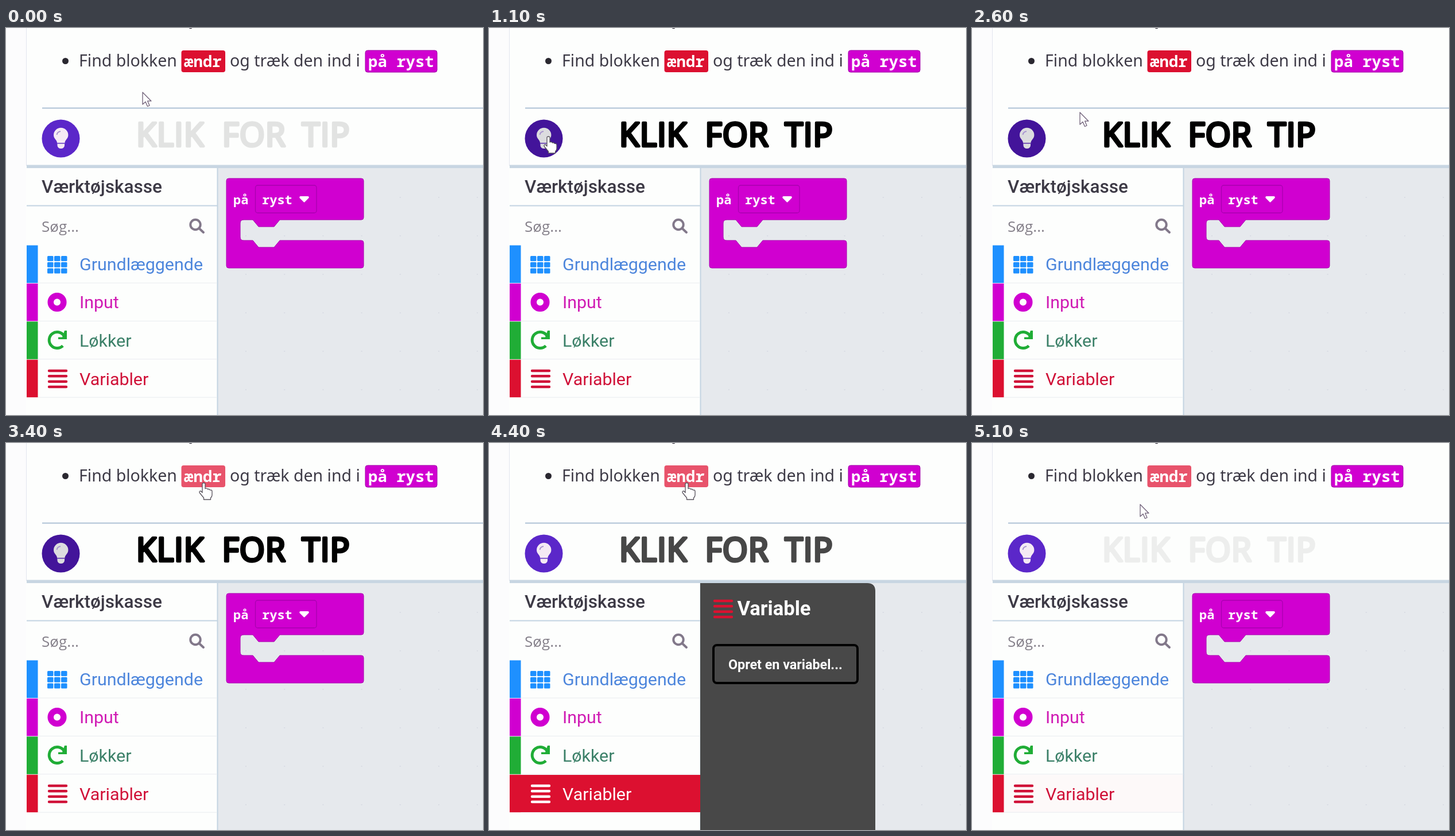
Animation of 831 by 674 pixels, one loop 5200 ms. Source, as an HTML page:

```html
<!DOCTYPE html>
<html lang="da">
<head>
<meta charset="utf-8">
<title>Klik for tip</title>
<style>
html, body { margin: 0; width: 100%; height: 100%; overflow: hidden; background: #fdfefd; }
svg { display: block; width: 831px; height: 674px; }
text { white-space: pre; }
.body { font: 28.5px "Noto Sans", sans-serif; fill: #3d3a46; }
.code { font: bold 27.3px "Noto Sans Mono", monospace; fill: #fff; }
.block { font: bold 22px "Noto Sans Mono", monospace; fill: #fff; }
.big { font-size: 24.2px; }
.item { font: 30.4px Roboto, sans-serif; }
.head { font: 500 31.5px Roboto, sans-serif; fill: #3d3a46; }
.search { font: 26px "Open Sans", sans-serif; fill: #85808a; }
.fly { font-family: Roboto, sans-serif; font-weight: 700; fill: #fff; }
.tip { font: 56.5px "Open Sans", sans-serif; letter-spacing: 1px; stroke: #000; stroke-width: 4.5; stroke-linejoin: round; }
.field { fill: none; stroke: #a900b0; stroke-width: 1.3; }
</style>
</head>
<body>
<svg viewBox="0 0 831 674">
  <defs>
    <path id="bars" d="M2 2H32M2 11.3H32M2 20.7H32M2 30H32" stroke="currentColor" stroke-width="4.4" stroke-linecap="round"/>
    <path id="caret" d="M-7-5H7Q9-4 8-2L1 5Q0 6-1 5L-8-2Q-9-4-7-5Z" fill="#fff"/>
    <pattern id="dots" x="417" y="294" width="67.2" height="67" patternUnits="userSpaceOnUse">
      <rect width="2" height="2" fill="#d9dce4"/>
    </pattern>
  </defs>

  <!-- instructions -->
  <rect width="831" height="674" fill="#fdfefd"/>
  <rect width="35" height="674" fill="#fcfcfd"/>
  <path d="M35.5 0V240" stroke="#e3e6ef"/>
  <path d="M319 0Q322 2 324 0" fill="#3d3a46" stroke="#3d3a46"/>
  <circle cx="103.5" cy="57.5" r="5.5" fill="#2a2830"/>
  <text class="body" x="127" y="67">Find blokken</text>
  <rect id="chip" x="305.5" y="39" width="76.5" height="38" rx="4"/>
  <text class="code" x="310" y="68">ændr</text>
  <text class="body" x="390" y="67">og træk den ind i</text>
  <rect x="626" y="39" width="125" height="38" rx="4" fill="#d000d0" stroke="#a000a8"/>
  <text class="code" x="631" y="68">på ryst</text>
  <path d="M63 139.5H831" stroke="#adc2d6" stroke-width="2"/>

  <!-- tip button -->
  <circle id="disc" cx="95.5" cy="192.5" r="33"/>
  <g id="bulb">
    <path d="M89 200C89 195 83 193 83 186.5A12.7 12.7 0 0 1 108.4 186.5C108.4 193 102.5 195 102.5 200Z"/>
    <path d="M89.5 201.5H102V205Q101 210 95.7 210Q90.5 210 89.5 205Z"/>
    <path d="M88.5 186Q89.5 180.5 95 180" fill="none" stroke="#a792d0" stroke-width="1.8"/>
    <path d="M89 201.5H102.5" stroke="#a792d0" stroke-width="1.2"/>
  </g>
  <g id="tip" class="tip">
    <text x="227" y="206">KLIK</text>
    <text x="376.5" y="206">FOR</text>
    <text x="515.5" y="206">TIP</text>
  </g>

  <!-- workspace -->
  <rect x="369" y="244" width="462" height="430" fill="#e6e9ed"/>
  <rect x="369" y="244" width="462" height="430" fill="url(#dots)"/>
  <rect x="36" y="238.5" width="795" height="5.5" fill="#c8d6e2"/>
  <path d="M388 262H619Q623 262 623 266V330Q623 334 619 334H477L467 346H440L430 334H414Q408 334 408 340V364Q408 370 414 370H430L440 382H467L477 370H619Q623 370 623 374V414Q623 418 619 418H388Q384 418 384 414V266Q384 262 388 262Z" fill="#d000d0" stroke="#a900b0"/>
  <text class="block" x="396" y="307">på</text>
  <rect class="field" x="434.5" y="274" width="106.5" height="48" rx="4"/>
  <text class="block" x="446" y="307">ryst</text>
  <use href="#caret" x="519.5" y="298"/>

  <!-- toolbox -->
  <path d="M368.5 244V674M36 309.5H368" stroke="#c3d4e2" stroke-width="2"/>
  <text class="head" x="62" y="287">Værktøjskasse</text>
  <text class="search" x="62" y="355">Søg...</text>
  <g fill="none" stroke="#82788a" stroke-width="4">
    <circle cx="330" cy="342.5" r="8.7"/>
    <path d="M336.5 349L344 356" stroke-linecap="round"/>
  </g>
  <g id="rows"></g>
  <rect id="flash" x="55" y="578" width="313" height="65" fill="#dc1030"/>
  <g id="variables">
    <use href="#bars" x="73" y="595"/>
    <text class="item" x="128" y="621.5" fill="currentColor">Variabler</text>
  </g>
  <g fill="#1e90ff" id="grid"></g>
  <circle cx="89" cy="477.5" r="11.3" fill="none" stroke="#d000d0" stroke-width="10.5"/>
  <path d="M101 536A14 14 0 1 0 99 553.5" fill="none" stroke="#20ad36" stroke-width="5"/>
  <path d="M106 527V542H91V538.5H98L102 527Z" fill="#20ad36"/>

  <!-- flyout -->
  <g id="flyout">
    <path d="M368 244H659Q673 244 673 258V674H368Z" fill="#484848"/>
    <g color="#dc1030"><use href="#bars" x="391" y="273"/></g>
    <text class="fly" x="432.5" y="300" font-size="34.6">Variable</text>
    <rect x="391" y="352" width="251" height="66" rx="6" fill="none" stroke="#000" stroke-width="4"/>
    <text class="fly" x="417" y="393.5" font-size="23.3">Opret en variabel...</text>
  </g>

  <!-- hint card -->
  <g id="card">
    <rect x="62" y="223" width="610" height="351" rx="24" fill="#c9d8e4"/>
    <rect x="63" y="225" width="604" height="344" rx="23" fill="#bffbf2"/>
    <rect x="76" y="239" width="577" height="316" rx="14" fill="#fdfefd"/>
    <circle cx="606.5" cy="276.5" r="20"/>
    <path d="M599.5 269.5L613.5 283.5M613.5 269.5L599.5 283.5" stroke="#fff" stroke-width="6.5" stroke-linecap="round"/>
    <path d="M123 286.5H382Q385 286.5 385 290V361Q385 365 381 365H222L210 378H183L172 365H146V446H381Q385 446 385 450V494Q385 497.5 381 497.5H123Q120 497.5 120 494V290Q120 286.5 123 286.5Z" fill="#d000d0" stroke="#a900b0"/>
    <text class="block big" x="133" y="334">på</text>
    <rect class="field" x="176" y="299" width="117" height="52" rx="4"/>
    <text class="block big" x="189" y="334">ryst</text>
    <use href="#caret" x="269.5" y="325"/>
    <path d="M150 365.5H172L183 377.5H210L222 365.5H552Q556 365.5 556 369V441Q556 445 552 445H222L210 458H183L172 445H150Q146 445 146 441V369Q146 365.5 150 365.5Z" fill="#dc1030" stroke="#b00c28"/>
    <text class="block big" x="158.5" y="414">ændr</text>
    <rect class="field" x="232" y="379" width="190" height="52" rx="4" style="stroke:#b00c28"/>
    <text class="block big" x="244.5" y="414">antalRyst</text>
    <use href="#caret" x="399" y="405"/>
    <text class="block big" x="435" y="414">af</text>
    <rect x="478" y="380" width="65.5" height="51" rx="25.5" fill="#fff"/>
    <text class="block big" x="503.5" y="414" style="fill:#555;font-weight:500">1</text>
  </g>

  <!-- pointers, tip at 0,0 -->
  <path id="arrow" d="M0 0V21L5 16.5L8.5 24.5L12 23L8.7 15.2H15Z" fill="#fff" stroke="#6f6078" stroke-width="1.3" stroke-linejoin="round"/>
  <path id="hand" d="M-2.5 2Q-2.5 0 0 0Q2.5 0 2.5 2V10Q5 8.5 7 11Q9.5 10 11 12.5Q14.5 11.5 14.5 15V21Q14.5 24 12 26V29H0V26L-7 17.5Q-8.5 15-6 14Q-4.5 14-2.5 17Z" fill="#fff" stroke="#55505a" stroke-width="1.3" stroke-linejoin="round"/>
</svg>
<script>
const LOOP = 5200, STEP = 100;
const CARD = [1600, 2500], FLYOUT = [3700, 5000];
const $ = id => document.getElementById(id);

const items = [
  ["Grundlæggende", "#1e90ff", "#4d86dc"],
  ["Input", "#d000d0", "#d01bb4"],
  ["Løkker", "#20ad36", "#3b8068"],
  ["", "#dc1030"]
];
$("rows").innerHTML = items.map(([name, bar, ink], i) => {
  const y = 378.5 + i * 66.4;
  return `<rect x="36" y="${y}" width="19.5" height="65.5" fill="${bar}"/>
    <path d="M56 ${y + 65.5}H368" stroke="#e9ecf0"/>
    <text class="item" x="128" y="${y + 43.5}" fill="${ink}">${name}</text>`;
}).join("");

for (let i = 0; i < 9; i++) {
  $("grid").innerHTML += `<rect x="${72 + i % 3 * 12}" y="${397 + (i / 3 | 0) * 10.8}" width="10.5" height="9" rx="1.5"/>`;
}

// time, x, y of the pointer
const path = [
  [0, 238, 112], [800, 103.5, 189], [2000, 103.5, 189],
  [2400, 188, 147], [2700, 188, 147], [3300, 344.5, 69.5],
  [4600, 344.5, 69.5], [5000, 293, 107]
];
// time, opacity
const tipFade = [[0, .1], [900, 1], [4100, 1], [5100, .06]];
const rowFade = [[3700, 0], [3800, .15], [4100, 1], [4900, 1], [5100, .02]];

function at(keys, t, col = 1, ease = k => k) {
  const i = keys.findIndex(k => k[0] > t);
  if (i < 1) return keys[i < 0 ? keys.length - 1 : 0][col];
  const a = keys[i - 1], b = keys[i];
  return a[col] + (b[col] - a[col]) * ease((t - a[0]) / (b[0] - a[0]));
}
const smooth = k => k * k * (3 - 2 * k);
const within = (t, [from, to]) => t >= from && t < to;
const show = (id, on) => $(id).style.display = on ? "" : "none";

function draw(t) {
  const x = at(path, t, 1, smooth), y = at(path, t, 2, smooth);
  const onBulb = Math.hypot(x - 95.5, y - 192.5) < 33;
  const onChip = x > 305 && x < 383 && y > 38 && y < 78;
  const dark = onBulb || within(t, [CARD[0], FLYOUT[0]]);
  const open = within(t, FLYOUT);

  $("disc").setAttribute("fill", dark ? "#43149a" : "#5b27c9");
  $("bulb").setAttribute("fill", dark ? "#dcdcdf" : "#f5eaf4");
  $("chip").setAttribute("fill", onChip || t >= FLYOUT[0] ? "#e8536b" : "#dc1030");
  $("tip").style.opacity = at(tipFade, t);
  $("flash").style.opacity = at(rowFade, t);
  $("variables").style.color = open ? "#fff" : "#d01138";
  show("flyout", open);
  show("card", within(t, CARD));

  const hand = onBulb || onChip;
  show("hand", hand);
  show("arrow", !hand);
  $(hand ? "hand" : "arrow").setAttribute("transform", `translate(${x} ${y})`);
}

const start = performance.now();
function tick() {
  const t = (performance.now() - start) % LOOP;
  draw(Math.floor(t / STEP) * STEP);
  requestAnimationFrame(tick);
}
tick();
</script>
</body>
</html>
```
